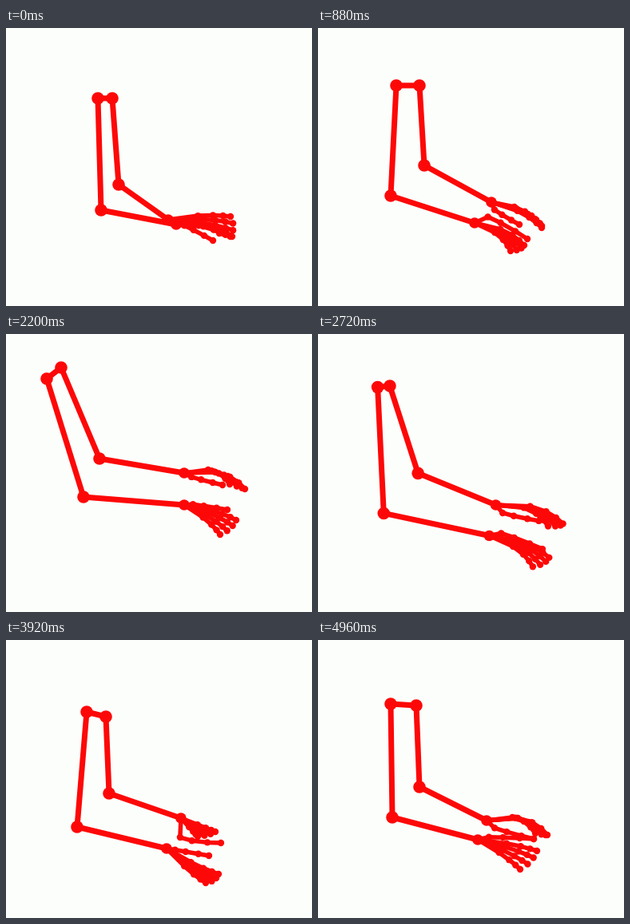
An HTML page with a canvas for the animation above (5000 ms loop, 383 by 348 pixels).

```html
<!DOCTYPE html>
<html lang="en">
<head>
<meta charset="utf-8">
<title>Arm skeleton</title>
<style>
html, body { margin: 0; width: 100%; height: 100%; overflow: hidden; background: #fcfefb; }
canvas { display: block; }
</style>
</head>
<body>
<canvas id="stage" width="383" height="348"></canvas>
<script>
const ctx = document.getElementById('stage').getContext('2d');
const LOOP = 5000, STEP = 40, RED = '#fd0808';

const times = [0, 880, 1520, 2200, 3200, 3920, 4960];

// Each row: near x, y, far x, y.
const shoulders = [
  [115, 88, 133, 88], [98, 72, 127, 72], [51, 64, 67, 56], [51, 56, 69, 42],
  [103, 80, 117, 90], [101, 90, 125, 96], [91, 80, 123, 82]
];
const elbows = [
  [119, 228, 141, 196], [91, 210, 133, 172], [83, 206, 115, 164], [97, 204, 117, 156],
  [71, 242, 133, 192], [89, 234, 129, 192], [93, 222, 127, 184]
];
const wrists = [
  [213, 246, 203, 240], [196, 244, 217, 218], [197, 232, 207, 194], [223, 214, 223, 174],
  [191, 286, 208, 249], [201, 261, 219, 223], [200, 250, 211, 226]
];

// Each row: thumb tip, index tip, pinky tip, thumb bend, finger bend.
const nearHand = [
  [259, 266, 283, 261, 267, 257, 3, 7],
  [262, 264, 258, 272, 241, 279, 12, 6],
  [270, 254, 266, 263, 248, 271, 8, 4],
  [277, 220, 288, 233, 268, 251, 2, 3],
  [268, 312, 273, 322, 253, 327, 10, 8],
  [254, 270, 266, 293, 250, 304, 0, -2],
  [270, 249, 274, 264, 253, 287, 3, 2]
];
const farHand = [
  [262, 250, 281, 236, 281, 261, -2, 3],
  [252, 246, 280, 250, 273, 240, -5, 5],
  [246, 224, 272, 226, 259, 225, -5, 11],
  [271, 189, 299, 194, 280, 188, -2, 11],
  [265, 276, 292, 276, 274, 287, -12, 8],
  [269, 254, 262, 240, 240, 246, -21, 0],
  [270, 249, 287, 244, 272, 242, -5, 12]
];

// Swings between the main poses: centre, half width, then x/y shift of each part.
const swings = [
  { at: 380, span: 380, hand: [4, 42], elbow: [0, 8], shoulder: [0, 0] },
  { at: 1200, span: 300, hand: [0, 20], elbow: [-14, 12], shoulder: [0, 0] },
  { at: 1860, span: 330, hand: [14, 0], elbow: [0, 0], shoulder: [-9, -8] },
  { at: 2500, span: 290, hand: [6, 0], elbow: [-5, 0], shoulder: [-28, -5] },
  { at: 2880, span: 300, hand: [14, 0], elbow: [0, 0], shoulder: [0, 0] },
  { at: 3540, span: 330, hand: [22, 14], elbow: [-18, 4], shoulder: [0, -14] },
  { at: 4240, span: 300, hand: [0, 16], elbow: [-16, 4], shoulder: [0, 0] },
  { at: 4710, span: 240, hand: [6, 22], elbow: [-10, 4], shoulder: [0, -14] }
];

function slope(rows, i, k) {
  const a = Math.max(i - 1, 0), b = Math.min(i + 1, times.length - 1);
  return (rows[b][k] - rows[a][k]) / (times[b] - times[a]);
}

// Cubic Hermite interpolation of one row.
function sample(rows, t) {
  let i = 0;
  while (i < times.length - 2 && t >= times[i + 1]) i++;
  const span = times[i + 1] - times[i];
  const u = Math.min((t - times[i]) / span, 1);
  const u2 = u * u, u3 = u2 * u;
  return rows[i].map((from, k) =>
    from * (2 * u3 - 3 * u2 + 1) + rows[i + 1][k] * (3 * u2 - 2 * u3) +
    span * (slope(rows, i, k) * (u3 - 2 * u2 + u) + slope(rows, i + 1, k) * (u3 - u2)));
}

function shiftOf(part, t) {
  const sum = [0, 0];
  for (const s of swings) {
    const d = Math.abs(t - s.at) / s.span;
    if (d >= 1) continue;
    const w = Math.cos(d * Math.PI / 2) ** 2;
    sum[0] += s[part][0] * w;
    sum[1] += s[part][1] * w;
  }
  return sum;
}

function points(rows, count, part, t) {
  const row = sample(rows, t), [dx, dy] = shiftOf(part, t);
  return Array.from({ length: count }, (_, i) => [row[2 * i] + dx, row[2 * i + 1] + dy]);
}

function line(pts, width) {
  ctx.lineWidth = width;
  ctx.beginPath();
  pts.forEach(p => ctx.lineTo(p[0], p[1]));
  ctx.stroke();
}

function dot([x, y], r) {
  ctx.beginPath();
  ctx.arc(x, y, r, 0, Math.PI * 2);
  ctx.fill();
}

const mix = (a, b, u) => [a[0] + (b[0] - a[0]) * u, a[1] + (b[1] - a[1]) * u];

// Joints from wrist to tip, pushed sideways by the bend.
function finger(wrist, tip, bend, stops, weights) {
  const dx = tip[0] - wrist[0], dy = tip[1] - wrist[1], len = Math.hypot(dx, dy) || 1;
  const joints = stops.map((f, i) => [
    wrist[0] + dx * f + dy / len * bend * weights[i],
    wrist[1] + dy * f - dx / len * bend * weights[i]
  ]);
  return [wrist, ...joints, tip];
}

function drawHand(wrist, rows, t) {
  const [thumb, index, pinky] = points(rows, 3, 'hand', t);
  const [thumbBend, bend] = sample(rows, t).slice(6);
  const fingers = [finger(wrist, thumb, thumbBend, [0.2, 0.45, 0.75], [1, 0.8, 0.4])];
  for (let i = 0; i < 4; i++) {
    const tip = mix(index, pinky, i / 3);
    const reach = i === 1 || i === 2 ? 1.04 : 1;
    fingers.push(finger(wrist, mix(wrist, tip, reach), bend, [0.48, 0.72, 0.88], [1, 0.9, 0.5]));
  }
  for (const f of fingers) {
    line(f, 5.5);
    f.slice(1).forEach(p => dot(p, 4.2));
  }
  line(fingers.slice(1).map(f => f[1]), 5.5);
}

function draw(t) {
  ctx.fillStyle = '#fcfefb';
  ctx.fillRect(0, 0, 383, 348);
  ctx.fillStyle = ctx.strokeStyle = RED;
  ctx.lineJoin = ctx.lineCap = 'round';

  const s = points(shoulders, 2, 'shoulder', t);
  const e = points(elbows, 2, 'elbow', t);
  const w = points(wrists, 2, 'hand', t);
  line([w[0], e[0], s[0], s[1], e[1], w[1]], 7);
  [...s, ...e].forEach(p => dot(p, 7.8));
  w.forEach(p => dot(p, 6.8));
  drawHand(w[0], nearHand, t);
  drawHand(w[1], farHand, t);
}

const start = performance.now();
function tick() {
  const t = (performance.now() - start) % LOOP;
  draw(Math.floor(t / STEP) * STEP);
  requestAnimationFrame(tick);
}
tick();
</script>
</body>
</html>
```
